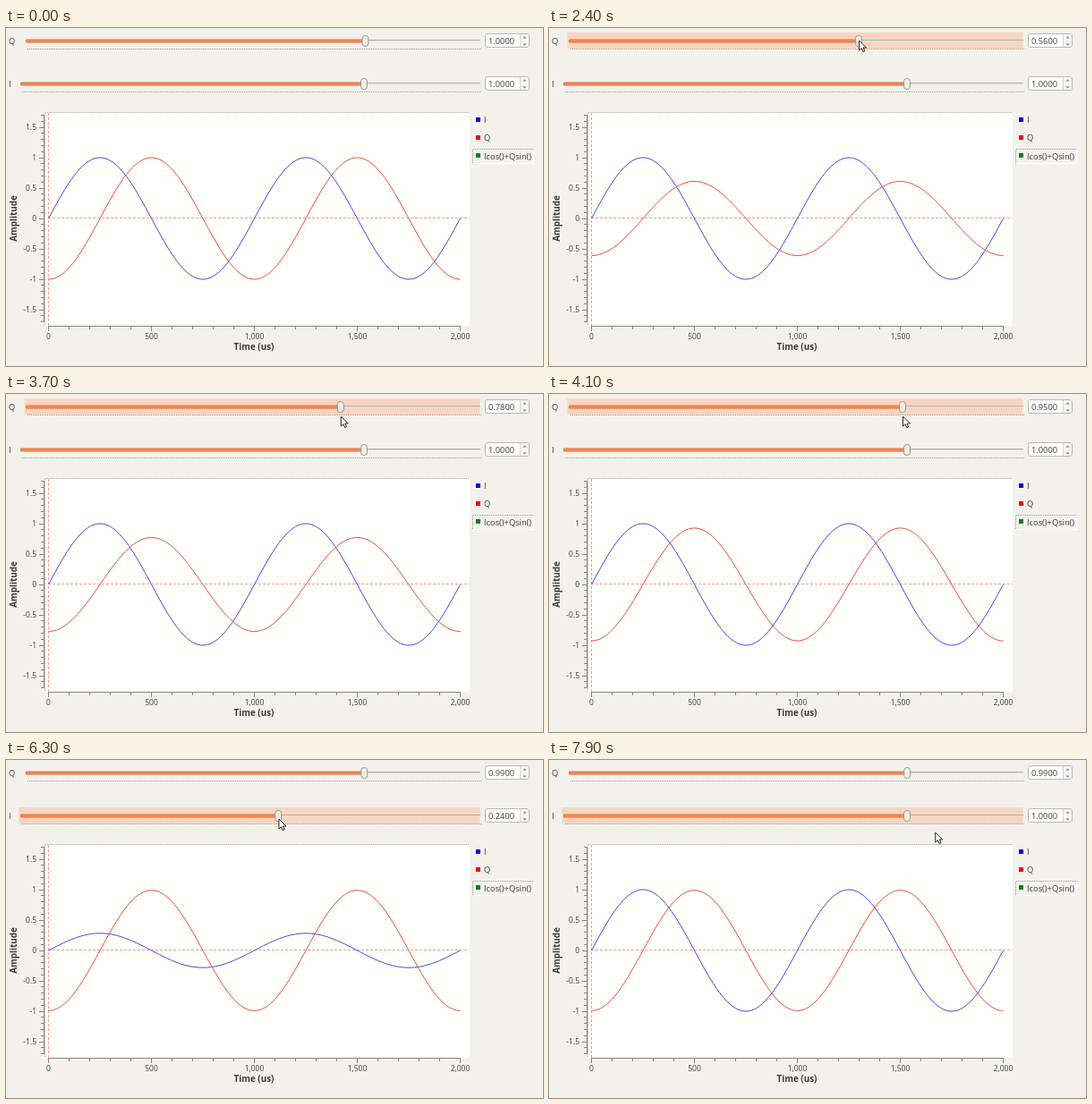
Animation, 600 px wide and 378 px high, one loop 8000 ms. Source, as an HTML page:

```html
<!DOCTYPE html>
<html lang="en">
<head>
<meta charset="utf-8">
<title>I/Q amplitude plot</title>
<style>
  html, body { margin: 0; width: 100%; height: 100%; overflow: hidden; background: #f2f1ec; }
  svg { display: block; width: 600px; height: 378px; }
  text { font: 9.3px "Open Sans", "Noto Sans", sans-serif; fill: #3c3c3c; }
  .tick { font-size: 8.5px; }
  .title { font-weight: 700; font-size: 9.9px; }
  .mid { text-anchor: middle; }
  .end { text-anchor: end; }
</style>
</head>
<body>
<svg id="stage" viewBox="0 0 600 378"></svg>
<script>
const LOOP = 8000, STEP = 100, LAG = 50;
const stage = document.getElementById("stage");

function add(tag, attrs, text) {
  const node = document.createElementNS("http://www.w3.org/2000/svg", tag);
  for (const key in attrs) node.setAttribute(key, attrs[key]);
  if (text !== undefined) node.textContent = text;
  return stage.appendChild(node);
}
const rect = (x, y, width, height, fill, more) => add("rect", { x, y, width, height, fill, ...more });
const path = (d, stroke, more) => add("path", { d, stroke, fill: "none", ...more });
const label = (x, y, text, cls = "") => add("text", { x, y, class: cls }, text);

// Linear interpolation through [time, value] keys
function track(keys, t) {
  if (t <= keys[0][0]) return keys[0][1];
  for (let i = 1; i < keys.length; i++) {
    const [t0, a] = keys[i - 1], [t1, b] = keys[i];
    if (t <= t1) return a + (b - a) * (t - t0) / (t1 - t0);
  }
  return keys[keys.length - 1][1];
}

const qKeys = [[1450, 1], [1600, .94], [1800, .93], [2250, .71], [2400, .56], [2550, .5],
               [3050, .95], [3450, .74], [3700, .78], [4200, .99]];
const iKeys = [[5000, 1], [5100, .96], [5400, .96], [5800, .66], [6300, .24], [6500, .2], [7150, .95], [7400, 1]];
const pointerX = [[100, 500], [900, 455], [1350, 402], [7400, 402], [7900, 433]];
const pointerY = [[100, 350], [900, 270], [1350, 16], [2400, 14], [3200, 20], [3700, 25], [4300, 25],
                  [4800, 60], [5100, 63], [6300, 66], [7400, 70], [7900, 81]];

// Slider row with its spin box
function makeSlider(name, left, y, zero) {
  label(3, y + 4, name);
  const glow = rect(left - 1.5, y - 9, 531 - left, 18, "#f8d5c0");
  path(`M${left + 2} ${y + 9.5}H531`, "#97968f", { "stroke-dasharray": "1 1" });
  path(`M${left} ${y - .5}H530`, "#b2b0aa");
  path(`M${left} ${y + .5}H530`, "#e2e0da");
  const edge = rect(left, y - 1.5, 1, 4, "#dd7042", { rx: 1.5 });
  const fill = rect(left + .5, y - 1, 1, 3, "#f28350", { rx: 1 });
  const knob = rect(0, y - 5.5, 7, 12, "#eeede8", { rx: 3.2, stroke: "#9a9890" });
  rect(535.5, y - 7.5, 49, 15, "#fff", { rx: 2.5, stroke: "#bab8b2" });
  rect(574, y - 7, 10, 14, "#f5f4f0", { rx: 2 });
  path(`M574.5 ${y - 7}V${y + 7}`, "#d8d6d0");
  path(`M577.5 ${y - 2.5}l2 -2 2 2zM577.5 ${y + 3.5}l2 2 2 -2z`, "none", { fill: "#7a7872" });
  const value = label(539, y + 3.5, "");
  const position = v => zero + 126 * v;
  return {
    position,
    set(v, hover) {
      const x = position(v);
      glow.setAttribute("visibility", hover ? "visible" : "hidden");
      edge.setAttribute("width", x - left);
      fill.setAttribute("width", x - left - 1);
      knob.setAttribute("x", x - 3.5);
      value.textContent = v.toFixed(2) + "00";
    }
  };
}

const qSlider = makeSlider("Q", 22, 14, 275.5);
const iSlider = makeSlider("I", 16, 62, 274);

// Plot area and axes
const plotX = us => 47.5 + us * .23;
const plotY = v => 213 - v * 68;

rect(44, 95, 474, 238, "#fffffc");
path("M44 94.5H518M43.5 95V333", "#aeaca6", { "stroke-dasharray": "1 1" });
path("M47.5 95V333M47 212.5H518", "#f79a8e", { "stroke-dasharray": "3 2" });

let ticks = "M42.5 97V329M47 333.5H508";
for (let n = -17; n <= 17; n++) {
  const major = n % 5 === 0;
  ticks += `M42 ${Math.floor(plotY(n / 10)) + .5}h${major ? -5 : -3}`;
  if (major) label(34, plotY(n / 10) + 3, n / 10, "tick end");
}
for (let us = 0; us <= 2000; us += 100) {
  const major = us % 500 === 0;
  ticks += `M${Math.floor(plotX(us)) + .5} 334v${major ? 5 : 3}`;
  if (major) label(plotX(us), 348, us.toLocaleString("en-US"), "tick mid");
}
path(ticks, "#85847e");
label(277, 360, "Time (us)", "title mid");
label(0, 0, "Amplitude", "title mid").setAttribute("transform", "translate(12 213) rotate(-90)");

// Legend
path("M521.5 151V135.5H589", "#9a9892", { "stroke-dasharray": "1 1" });
path("M522 151.5H589.5V136", "#fff");
[["I", "#0000e6"], ["Q", "#f00000"], ["Icos()+Qsin()", "#0b800b"]].forEach(([name, color], n) => {
  const y = 102.5 + n * 20.4;
  rect(525, Math.round(y - 3), 5, 5, color);
  label(534, y + 3.3, name);
});

const iCurve = path("", "#4545dd");
const qCurve = path("", "#e64a40");
const pointer = add("path", {
  d: "M0 0V11L2.6 8.7 4.3 12.6 6.2 11.8 4.5 8H8Z",
  fill: "#fff", stroke: "#222", "stroke-width": 1
});

function drawWave(curve, amplitude, shift) {
  let d = "";
  for (let us = 0; us <= 2000; us += 10) {
    const v = amplitude * Math.sin(us * Math.PI / 500 + shift);
    d += `${us ? "L" : "M"}${plotX(us).toFixed(1)} ${plotY(v).toFixed(2)}`;
  }
  curve.setAttribute("d", d);
}

function render(time) {
  const t = Math.floor(time % LOOP / STEP) * STEP;
  const q = track(qKeys, t), i = track(iKeys, t);
  qSlider.set(q, t >= 1300 && t < 4600);
  iSlider.set(i, t >= 4700);

  // The curves trail the sliders slightly
  drawWave(iCurve, track(iKeys, t - LAG), 0);
  drawWave(qCurve, track(qKeys, t - LAG), -Math.PI / 2);

  const dragged = qSlider.position(q) - qSlider.position(1) + iSlider.position(i) - iSlider.position(1);
  pointer.setAttribute("visibility", t < 100 ? "hidden" : "visible");
  pointer.setAttribute("transform", `translate(${track(pointerX, t) + dragged} ${track(pointerY, t)})`);
}

const start = performance.now();
function tick() {
  render(performance.now() - start);
  requestAnimationFrame(tick);
}
tick();
</script>
</body>
</html>
```
